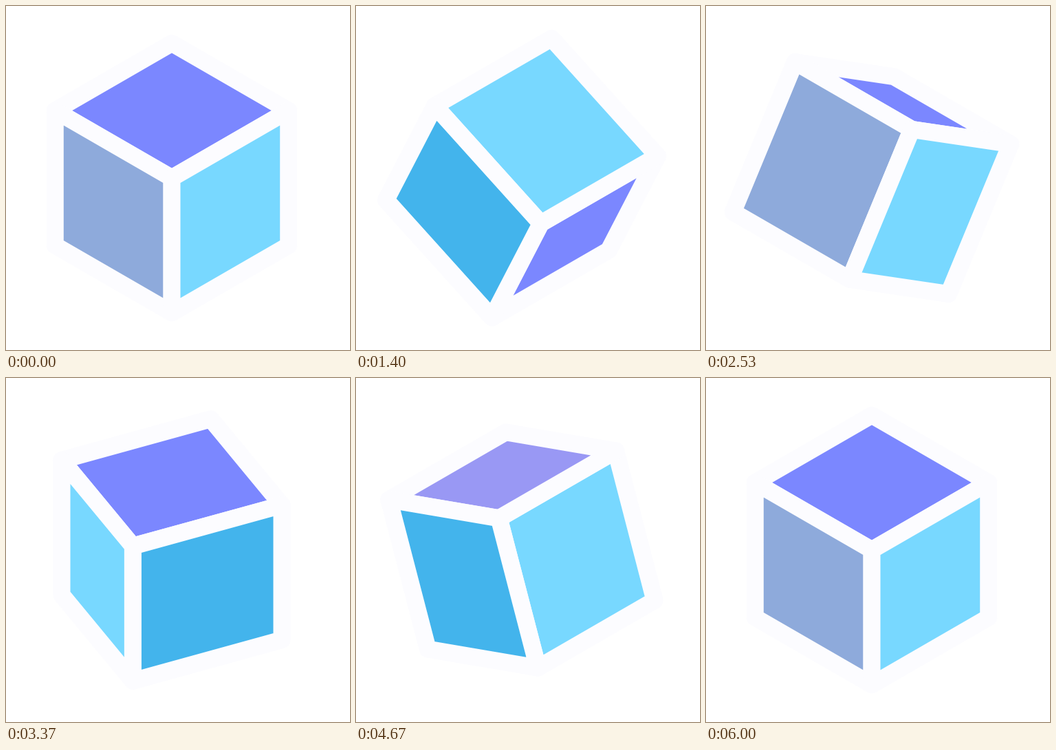
Animation of 500 by 500 pixels, one loop 6.06 s. Source, as an HTML page with a canvas:

```html
<!DOCTYPE html>
<html lang="en">
<head>
<meta charset="utf-8">
<title>Turning cube</title>
<style>
  html, body { margin: 0; width: 100%; height: 100%; overflow: hidden; background: #fff; }
  canvas { display: block; width: 500px; height: 500px; filter: blur(0.7px); }
</style>
</head>
<body>
<canvas id="stage" width="500" height="500"></canvas>
<script>
const ctx = document.getElementById('stage').getContext('2d');
const LOOP = 6060, CYCLE = 3000;
const CX = 241, CY = 250, HALF = 120, EDGE = 25;
const EDGE_COLOR = '#fcfcff';

// Axes: 0 = up, 1 = left front, 2 = right front
const FACES = [
  { axis: 0, sign: 1, color: '#7b87ff' },
  { axis: 1, sign: 1, color: '#8eaadb' },
  { axis: 2, sign: 1, color: '#78d8ff' },
  { axis: 0, sign: -1, color: '#9998f4' },
  { axis: 1, sign: -1, color: '#43b4ec' },
  { axis: 2, sign: -1, color: '#a591ff' }
];

// Each half turn carries one axis towards another
const TURNS = [
  { from: 2, to: 1, start: 8 },
  { from: 0, to: 2, start: 1030 },
  { from: 0, to: 1, start: 2000 }
];

// cubic-bezier(.25, .1, .25, 1)
function ease(x) {
  if (x <= 0) return 0;
  if (x >= 1) return 1;
  let lo = 0, hi = 1, s = 0.5;
  for (let i = 0; i < 24; i++) {
    s = (lo + hi) / 2;
    if (0.75 * s * (1 - s) + s ** 3 < x) lo = s; else hi = s;
  }
  return 0.3 * s * (1 - s) ** 2 + 3 * s * s * (1 - s) + s ** 3;
}

function turn(p, angles) {
  const v = p.slice();
  TURNS.forEach(({ from, to }, i) => {
    const c = Math.cos(angles[i]), s = Math.sin(angles[i]);
    const a = v[from], b = v[to];
    v[from] = a * c - b * s;
    v[to] = b * c + a * s;
  });
  return v;
}

const project = ([up, left, right]) => [
  CX + HALF * (right - left) * Math.SQRT1_2,
  CY + HALF * ((left + right) / 2 - up) * Math.sqrt(2 / 3)
];

function drawFace({ axis, sign, color }, angles) {
  const normal = [0, 0, 0];
  normal[axis] = sign;
  const depth = turn(normal, angles).reduce((a, b) => a + b);
  if (depth <= 0) return;

  ctx.beginPath();
  for (const [a, b] of [[-1, -1], [1, -1], [1, 1], [-1, 1]]) {
    const corner = normal.slice();
    corner[(axis + 1) % 3] = a;
    corner[(axis + 2) % 3] = b;
    ctx.lineTo(...project(turn(corner, angles)));
  }
  ctx.closePath();
  ctx.fillStyle = color;
  ctx.fill();
  ctx.stroke();
}

// 25 poses a second, shown on a 30 Hz clock
function poseTime(ms) {
  const tick = Math.floor((ms + 4) * 0.03);
  return Math.min(Math.floor(tick * 5 / 6) * 40, 6000);
}

function draw(ms) {
  const t = poseTime(ms) % CYCLE;
  const angles = TURNS.map(({ start }) => Math.PI * ease((t - start) / 1000));
  ctx.fillStyle = '#fff';
  ctx.fillRect(0, 0, 500, 500);
  ctx.lineWidth = EDGE;
  ctx.lineJoin = 'round';
  ctx.strokeStyle = EDGE_COLOR;
  FACES.forEach(face => drawFace(face, angles));
}

const begin = performance.now();
function frame() {
  draw((performance.now() - begin) % LOOP);
  requestAnimationFrame(frame);
}
frame();
</script>
</body>
</html>
```
